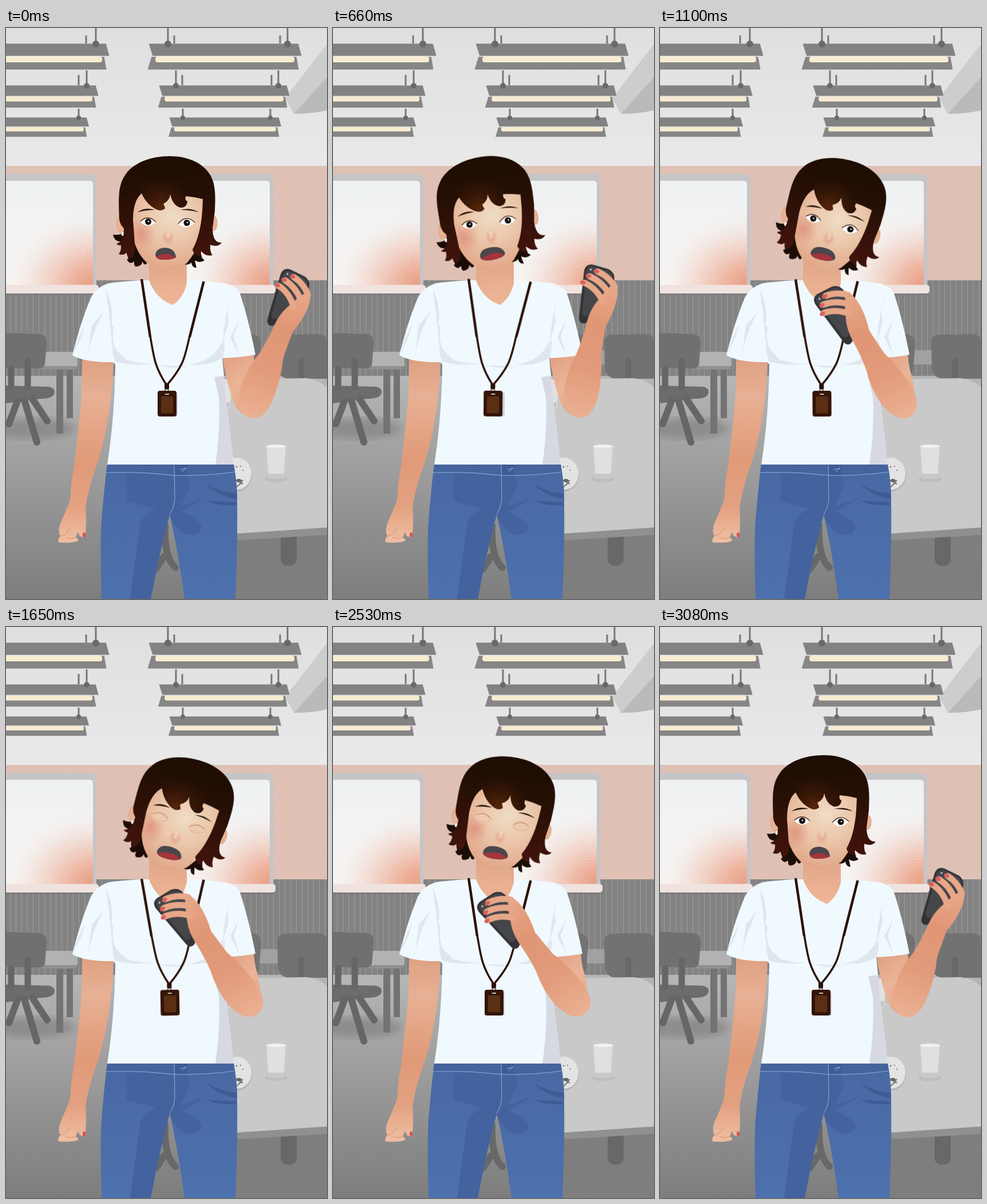
An HTML page that plays this animation: 561x998 px, repeating every 3.3 s.

```html
<!DOCTYPE html>
<html lang="en">
<head>
<meta charset="utf-8">
<title>Phone call in the canteen</title>
<style>
html, body { margin: 0; width: 100%; height: 100%; overflow: hidden; background: #e4e4e4; }
svg { position: absolute; left: 0; top: 0; width: 561px; height: 998px; will-change: transform; }

#head, #arm, #lanyard, #lids, .mouth { animation: 3300ms infinite; }

#head { transform-origin: 280px 412px; animation-name: tilt; }
@keyframes tilt {
  0% { transform: rotate(0deg); animation-timing-function: steps(4); }
  13.333% { transform: rotate(-4.2deg); animation-timing-function: steps(2); }
  20% { transform: rotate(-8deg); animation-timing-function: steps(2); }
  26.666% { transform: rotate(3.6deg); animation-timing-function: steps(2); }
  33.333% { transform: rotate(14.5deg); animation-timing-function: steps(5); }
  50% { transform: rotate(16deg); animation-timing-function: steps(3); }
  60% { transform: rotate(16deg); animation-timing-function: steps(5); }
  76.666% { transform: rotate(11deg); animation-timing-function: steps(5); }
  93.333%, 100% { transform: rotate(0deg); }
}

#arm { transform-origin: 425px 638px; animation-name: swing; }
@keyframes swing {
  0% { transform: translate(8px, 2px) rotate(22deg); animation-timing-function: steps(4); }
  13.333% { transform: translate(7px, 2px) rotate(20deg); animation-timing-function: steps(1); }
  16.666% { transform: translate(6px, 2px) rotate(18deg); animation-timing-function: steps(3); }
  26.666% { transform: translate(0, 0) rotate(0deg); animation-timing-function: steps(2); }
  33.333% { transform: translate(-14px, 9px) rotate(-31deg); animation-timing-function: steps(5); }
  50% { transform: translate(-14px, 9px) rotate(-34.5deg); animation-timing-function: steps(2); }
  56.666% { transform: translate(-14px, 9px) rotate(-35.2deg); animation-timing-function: steps(1); }
  60% { transform: translate(-14px, 9px) rotate(-35.2deg); animation-timing-function: steps(5); }
  76.666% { transform: translate(-14px, 9px) rotate(-37deg); animation-timing-function: steps(5); }
  93.333%, 100% { transform: translate(8px, 2px) rotate(22deg); }
}

#lanyard { transform-origin: 290px 440px; animation-name: sway; }
@keyframes sway {
  0% { transform: rotate(0deg); animation-timing-function: steps(4); }
  13.333% { transform: rotate(0deg); animation-timing-function: steps(4); }
  26.666% { transform: rotate(.95deg); animation-timing-function: steps(2); }
  33.333% { transform: rotate(-.4deg); animation-timing-function: steps(5); }
  50% { transform: rotate(-1.35deg); animation-timing-function: steps(2); }
  56.666% { transform: rotate(-.8deg); animation-timing-function: steps(1); }
  60% { transform: rotate(-.8deg); animation-timing-function: steps(5); }
  76.666%, 100% { transform: rotate(0deg); }
}

#lids { animation-name: blink; animation-timing-function: step-end; }
@keyframes blink {
  0%, 56.666%, 83.333%, 100% { opacity: 0; }
  50%, 76.666% { opacity: 1; }
}

.mouth { animation-timing-function: step-end; }
#round { animation-name: round; }
#shut { animation-name: shut; }
#wide { animation-name: wide; }
@keyframes round { 0%, 83.333%, 100% { opacity: 1; } 10% { opacity: 0; } }
@keyframes shut { 0%, 20%, 100% { opacity: 0; } 10% { opacity: 1; } }
@keyframes wide { 0%, 83.333%, 100% { opacity: 0; } 20% { opacity: 1; } }
</style>
</head>
<body>
<svg id="room" viewBox="0 0 561 998">
  <defs>
    <linearGradient id="ceiling" x2="0" y2="1"><stop stop-color="#dfdfdf"/><stop offset="1" stop-color="#e9e9e9"/></linearGradient>
    <linearGradient id="floor" x2="0" y2="1"><stop stop-color="#b6b6b6"/><stop offset=".3" stop-color="#a4a4a4"/><stop offset="1" stop-color="#7d7d7d"/></linearGradient>
    <linearGradient id="pane" x2="0" y2="1"><stop stop-color="#eef1f2"/><stop offset="1" stop-color="#f7f4f2"/></linearGradient>
    <radialGradient id="sunset"><stop stop-color="#e8977a"/><stop offset=".3" stop-color="#ecaa92" stop-opacity=".85"/><stop offset=".65" stop-color="#f1cdbf" stop-opacity=".6"/><stop offset="1" stop-color="#f5e6df" stop-opacity="0"/></radialGradient>
    <pattern id="slats" width="10" height="10" patternUnits="userSpaceOnUse"><path fill="#838383" d="M0 0H10V10H0Z"/><path fill="#9c9c9c" d="M7 0h1v10h-1z"/></pattern>
    <filter id="speckle"><feTurbulence type="fractalNoise" baseFrequency=".8" numOctaves="2"/><feDisplacementMap in="SourceGraphic" scale="70" xChannelSelector="R" yChannelSelector="G"/></filter>
    <filter id="grain" x="0" y="0" width="1" height="1"><feTurbulence type="fractalNoise" baseFrequency=".7"/><feColorMatrix values="0 0 0 0 .6  0 0 0 0 .42  0 0 0 0 .36  .5 0 0 0 -.14"/></filter>
    <filter id="soft"><feGaussianBlur stdDeviation="7"/></filter>
    <clipPath id="leftPane"><path d="M0 267H146Q152 267 152 273V449H0Z"/></clipPath>
    <clipPath id="rightPane"><path d="M300 267H455Q461 267 461 273V449H300Z"/></clipPath>
  </defs>
  <path fill="url(#ceiling)" d="M0 0H561V242H0Z"/>
  <path fill="#cdcdcd" d="M561 28L488 122L503 150L561 90Z"/>
  <path fill="#bababa" d="M561 86L503 150Q535 150 561 144Z"/>
  <g id="lamps"/>
  <path fill="#e0c2b6" d="M0 241H561V442H0Z"/>
  <path filter="url(#grain)" opacity=".55" d="M0 241H561V442H0Z"/>
  <path fill="url(#slats)" d="M0 441H561V609H0Z"/>
  <path fill="url(#floor)" d="M0 608H561V998H0Z"/>

  <g fill="#c5c5c8"><path d="M0 255H146Q158 255 158 268V450H0Z"/><path d="M296 255H455Q467 255 467 268V450H296Z"/></g>
  <g clip-path="url(#leftPane)"><path fill="url(#pane)" d="M0 260H160V450H0Z"/><ellipse cx="156" cy="452" rx="150" ry="125" fill="url(#sunset)" filter="url(#speckle)"/></g>
  <g clip-path="url(#rightPane)"><path fill="url(#pane)" d="M290 260H470V450H290Z"/><ellipse cx="465" cy="452" rx="140" ry="125" fill="url(#sunset)" filter="url(#speckle)"/></g>
  <path stroke="#6f6f6f" stroke-width="3" opacity=".5" d="M0 465H158M300 465H468"/>
  <g fill="#f0e3df"><rect x="-10" y="449" width="172" height="15" rx="5"/><rect x="290" y="449" width="181" height="15" rx="5"/></g>

  <!-- left table and chair -->
  <ellipse cx="45" cy="700" rx="75" ry="18" fill="#7c7c7c" opacity=".6" filter="url(#soft)"/>
  <path fill="#737373" d="M88 590h12v119h-12zM106 590h11v92h-11z"/>
  <path fill="#b2b2b2" d="M60 566H125V591H60Z"/><path fill="#8f8f8f" d="M60 591H123V597H60Z"/>
  <path fill="#707070" d="M0 533L60 535Q72 538 71 552L68 588Q66 596 55 595L0 594Z"/>
  <path fill="#6c6c6c" d="M0 625L75 627Q88 630 84 640Q80 648 60 648L0 656Z"/>
  <g fill="none" stroke="#666" stroke-width="11" stroke-linecap="round"><path d="M38 582V628M9 596V628"/><path stroke-width="12" d="M20 652L5 692M32 650L54 724M46 648L72 687"/></g>

  <!-- right side furniture -->
  <path fill="#a1a1a1" d="M440 563H475V588H440Z"/>
  <g fill="#727272"><path d="M400 535H430Q445 537 446 552L443 590Q442 609 430 612H400Z"/><path d="M486 536L548 535Q561 537 561 548V613H492Q476 610 475 592L474 550Q474 538 486 536Z"/></g>
  <path stroke="#686868" stroke-width="11" stroke-linecap="round" d="M516 582V612M426 585V606"/>
  <path fill="#7d7d7d" d="M395 890L561 884V998H395Z"/>
  <path filter="url(#grain)" opacity=".25" d="M395 890L561 884V998H395Z"/>
  <path fill="#686868" d="M480 885H508V930Q506 940 494 940Q482 940 480 930Z"/>
  <path fill="#c9c9c9" d="M350 615L525 612Q546 614 561 628V874L412 884L350 880Z"/>
  <path fill="#909090" d="M561 873L412 883Q400 885 380 883V894L412 895L561 886Z"/>
  <path fill="#e1e1e1" d="M366 614H395L391 665H370Z"/><path fill="#c4c4c4" d="M372 654H391L390 664H373Z"/>
  <ellipse cx="472" cy="788" rx="20" ry="6" fill="#bebebe"/>
  <path fill="#e0e0e0" stroke="#d6d6d6" d="M455 731L489 730L485 787H459Z"/><ellipse cx="472" cy="731" rx="17" ry="3" fill="#f1f1f1"/><path fill="#c8c8c8" d="M458 779H486L485 787H459Z"/>
  <ellipse cx="404" cy="781" rx="26" ry="29" fill="#b5b5b5"/><ellipse cx="404" cy="779" rx="25" ry="28" fill="#e3e3e3"/>
  <g fill="#666"><circle cx="403" cy="767" r="1.300"/><circle cx="410" cy="766" r="1"/><circle cx="414" cy="773" r="1"/><ellipse cx="407" cy="791" rx="5" ry="3"/></g>
  <path stroke="#777" stroke-width="2" d="M402 803L409 797L414 790M408 794L414 797"/>
  <path fill="none" stroke="#686868" stroke-width="12" stroke-linecap="round" d="M278 870Q276 925 296 943M276 924L262 946"/>
</svg>

<svg id="person" viewBox="0 0 561 998">
  <defs>
    <linearGradient id="hangArm" gradientUnits="userSpaceOnUse" x1="0" y1="580" x2="0" y2="900"><stop stop-color="#dfa183"/><stop offset=".2" stop-color="#e7b094"/><stop offset=".55" stop-color="#e09a78"/><stop offset=".8" stop-color="#e3a181"/><stop offset="1" stop-color="#efbfa3"/></linearGradient>
    <linearGradient id="upper" gradientUnits="userSpaceOnUse" x1="380" y1="580" x2="440" y2="660"><stop stop-color="#e1a183"/><stop offset=".5" stop-color="#ebb598"/><stop offset="1" stop-color="#e5a485"/></linearGradient>
    <linearGradient id="fore" gradientUnits="userSpaceOnUse" x1="0" y1="420" x2="0" y2="680"><stop stop-color="#eaad8f"/><stop offset=".35" stop-color="#e09675"/><stop offset=".65" stop-color="#e19a7a"/><stop offset="1" stop-color="#ebb193"/></linearGradient>
    <linearGradient id="neck" gradientUnits="userSpaceOnUse" x1="0" y1="400" x2="0" y2="484"><stop stop-color="#e0a587"/><stop offset="1" stop-color="#eeb697"/></linearGradient>
    <linearGradient id="hair" gradientUnits="userSpaceOnUse" x1="0" y1="224" x2="0" y2="400"><stop stop-color="#1d0d02"/><stop offset=".35" stop-color="#240f04"/><stop offset="1" stop-color="#42140d"/></linearGradient>
    <radialGradient id="fringe" gradientUnits="userSpaceOnUse" cx="270" cy="314" r="62"><stop stop-color="#572609"/><stop offset="1" stop-color="#2a1104" stop-opacity="0"/></radialGradient>
    <radialGradient id="face" gradientUnits="userSpaceOnUse" cx="291" cy="328" r="98"><stop stop-color="#efdcc5"/><stop offset=".45" stop-color="#ebc7ab"/><stop offset="1" stop-color="#e0a587"/></radialGradient>
    <radialGradient id="blush"><stop stop-color="#dd8a76" stop-opacity=".7"/><stop offset="1" stop-color="#dd8a76" stop-opacity="0"/></radialGradient>
    <linearGradient id="jeans" x2="0" y2="1"><stop stop-color="#4868a3"/><stop offset="1" stop-color="#4d71ae"/></linearGradient>
  </defs>

  <!-- hanging arm -->
  <path fill="url(#hangArm)" d="M133 578H188Q186 640 178 685Q170 735 153 780Q142 815 139 838Q141 860 139 884L137 891L129 888L126 881L122 890L127 895Q122 901 92 899Q90 893 95 888Q90 880 95 866Q104 846 112 825Q114 790 119 765Q128 690 132 640Z"/>
  <path fill="none" stroke="#d98c6c" d="M95 888Q105 887 112 874M122 890Q112 895 104 890"/>
  <ellipse cx="136.500" cy="886" rx="2.500" ry="4.500" fill="#d4545a"/>

  <!-- jeans -->
  <path fill="url(#jeans)" d="M177 762H398Q405 800 404 830Q405 900 401 998H312Q300 910 286 850Q270 910 253 998H167Q164 900 167 860Q172 800 177 762Z"/>
  <path fill="#45639d" d="M177 763H398L399 777Q340 785 294 781L175 777Z"/>
  <path fill="#44629d" d="M211 779L211 827L262 840Q238 850 234 870L217 998H253Q268 915 286 851Q300 886 325 886Q346 882 340 866Q322 850 306 846L350 820L305 836L322 800L318 782Z"/>
  <path fill="#3f5b94" d="M294 764H317L316 782H294ZM403 823Q375 820 348 796Q375 812 403 814ZM402 834Q370 836 350 826Q375 828 402 829Z"/>
  <path fill="none" stroke="#8fb0dc" d="M175 777Q235 776 262 779L294 782Q350 783 399 776M294 764L295 822Q294 838 286 850M304 772L315 769L307 776"/>

  <!-- neck, raised upper arm, shirt -->
  <path fill="url(#neck)" d="M250 395V436Q245 450 262 475L292 488L316 470V395Z"/>
  <path fill="url(#upper)" d="M378 574L433 569Q434 590 440 608Q447 640 443 655Q436 680 420 678Q404 670 398 655Q384 615 378 574Z"/>
  <path fill="#f0f9fe" d="M236 441Q200 443 180 446Q157 453 148 472Q130 515 116 572Q138 585 187 584L191 588Q190 680 177 763H398L387 670L378 577Q410 576 436 571Q424 510 409 464Q404 452 383 446Q350 442 317 441Q312 470 292 484Q262 474 250 441Z"/>
  <path fill="#d7d9e2" d="M364 610L381 608L387 670L398 763H366Q375 700 372 645Z"/>
  <g fill="#e0e6ed">
    <path d="M174 456Q190 490 184 518L188 524Q184 545 192 562L215 585Q192 583 187 572Q180 490 174 456Z"/>
    <path d="M170 496L150 520L143 574Q148 540 170 496ZM138 518L132 540L118 569Q124 545 138 518Z"/>
    <path d="M190 583Q222 592 262 586Q225 589 188 572ZM262 589L322 592L290 594Z"/>
    <path d="M318 588Q360 585 378 548L379 576Q356 592 318 588ZM397 458Q384 490 389 515L380 545Q385 550 379 575Q376 520 397 458Z"/>
    <path d="M407 511L392 540L409 575L398 540Z"/>
  </g>
  <rect x="270" y="637" width="30" height="42" rx="3" fill="#cfd0d6"/>

  <g id="lanyard">
    <g fill="none" stroke="#2d1006" stroke-linejoin="round"><path stroke-width="4.500" d="M237 439L252 540M345.500 443L321 540"/><path stroke-width="3.500" d="M252 538Q258 575 262 587Q268 605 280 623M321 538Q313 575 307 587Q298 605 282 623"/></g>
    <rect x="277" y="622" width="8" height="9" rx="1" fill="#2d1006"/><circle cx="281" cy="634" r="3" fill="none" stroke="#444" stroke-width="1.500"/>
    <rect x="265" y="634" width="33" height="45" rx="4" fill="#351507"/><rect x="270" y="643" width="23" height="31" rx="3" fill="#5a2f14" stroke="#210b02"/>
    <path stroke="#c9c2bd" stroke-width="2" d="M278 640H285"/>
  </g>

  <g id="head">
    <path fill="#1b0d05" d="M222 345L207 350Q206 364 187 361Q190 376 206 373L212 398Q216 405 211 404Q216 415 224 408Q223 417 228 417Q238 416 238 408Q242 416 246 412L244 380ZM325 380Q318 402 309 412Q318 416 324 410Q325 419 333 419Q331 412 330 406Q338 412 347 406Q338 400 338 385Z"/>
    <g fill="#e9b294" stroke="#dc9c7d"><ellipse cx="200" cy="343" rx="6.500" ry="14"/><ellipse cx="363" cy="341" rx="6" ry="13"/></g>
    <circle cx="205" cy="360" r="3.500" fill="#f5f5f5"/>
    <path fill="url(#face)" d="M215 275H350V350Q342 378 316 411Q295 425 276 425Q258 422 245 409Q228 393 222 365Z"/>
    <ellipse cx="237" cy="360" rx="24" ry="28" fill="url(#blush)"/>
    <ellipse cx="283" cy="366" rx="11" ry="14" fill="url(#blush)"/>
    <path fill="#f6dcc7" opacity=".6" d="M280 358Q283 350 287 359L286 368H280Z"/>
    <path fill="url(#hair)" d="M198 335C197 300 195 278 207 259C221 235 254 224 286 224C320 224 345 237 357 257C367 274 366 297 365 320L361 350Q361 376 377 375Q371 384 357 379Q356 392 361 397Q349 400 341 390Q340 396 343 400Q328 398 326 387Q340 362 343 320L344 299Q328 295 314 294Q312 301 317 303Q316 314 305 314Q291 310 287 290Q286 302 275 307L278 315Q272 321 263 317Q246 309 237 289Q222 302 222 335L225 377Q228 393 219 402Q211 400 212 391Q206 399 197 395Q202 389 201 380Q195 380 193 377Q207 373 206 350Q200 345 198 335Z"/>
    <path fill="url(#fringe)" d="M215 265H340V298L314 294Q312 301 317 303Q316 314 305 314Q291 310 287 290Q286 302 275 307L278 315Q272 321 263 317Q246 309 237 289Z"/>
    <path fill="#2b1a12" d="M230 322Q243 312 260 318Q245 318 230 322ZM305 318Q322 313 337 322Q321 318 305 318Z"/>
    <g fill="#fff"><path d="M235 339Q248 325 262 339Q249 352 235 339Z"/><path d="M301 342Q315 325 330 340Q316 355 301 342Z"/></g>
    <path fill="none" stroke="#49291b" stroke-width="1.300" d="M235 338Q248 325 262 339M301 342Q315 325 330 340"/>
    <circle cx="248.500" cy="338.500" r="5.500" fill="#14100e"/><circle cx="316" cy="340.500" r="5.500" fill="#14100e"/>
    <circle cx="249" cy="338" r="1.300" fill="#fff"/><circle cx="317" cy="340" r="1.300" fill="#fff"/>
    <g id="lids" fill="#edc9ae">
      <ellipse cx="248.500" cy="338.500" rx="14.500" ry="9.500"/><ellipse cx="315.500" cy="340.500" rx="15.500" ry="10"/>
      <path fill="none" stroke="#c99270" stroke-width="1.300" d="M235 336Q248 326 261 337M302 340Q315 328 329 338"/>
      <path fill="none" stroke="#dba98a" d="M236 341Q249 351 261 340M302 344Q316 353 329 342"/>
    </g>
    <g id="round" class="mouth"><path fill="#48474b" d="M261 396Q263 384 279 384Q296 386 297 401Q289 405 278 405Q262 406 261 396Z"/><path fill="#a5343c" d="M262 400Q270 395 281 395Q292 396 296 402Q288 405 278 405Q265 406 262 400Z"/></g>
    <path id="shut" class="mouth" fill="none" stroke="#c4705c" stroke-width="1.500" stroke-linecap="round" d="M265 391Q279 386 295 391"/>
    <g id="wide" class="mouth"><path fill="#48474b" d="M259 398Q259 384 279 383Q300 383 303 396Q303 403 284 405Q262 407 259 398Z"/><path fill="#a5343c" d="M260 401Q268 395 281 394Q294 393 301 399Q296 404 284 405Q266 406 260 401Z"/></g>
  </g>

  <g id="arm">
    <path fill="#323335" d="M390 426Q390 413 402 412L431 414Q443 417 445 430L438 480L416 508Q413 517 405 516Q399 515 398 506Z"/>
    <path fill="#45464a" d="M394 427Q394 416 404 415L430 417Q440 419 442 431L434 476L414 500Q406 506 402 499Z"/>
    <path fill="url(#fore)" d="M447 432Q456 444 456 464Q456 486 447 513L449 560Q461 600 459 643Q456 679 428 679Q405 675 399 635Q397 600 407 570Q412 545 413 515Q414 492 422 476L432 456Z"/>
    <g fill="none" stroke="#e7a788" stroke-width="10.500" stroke-linecap="round"><path d="M413 422Q434 426 448 442"/><path d="M401 433Q423 437 440 455"/><path d="M394 446Q416 450 432 470"/></g>
    <g fill="#d95f5c"><ellipse cx="411" cy="422" rx="5" ry="3.500"/><ellipse cx="399" cy="433" rx="5" ry="3.500"/><ellipse cx="392" cy="446" rx="5" ry="3.500"/></g>
    <circle cx="401" cy="421" r="1.500" fill="#e8e8e8"/>
  </g>
</svg>

<script>
// One hanging lamp; s is the size relative to the nearest row.
function lamp(x1, x2, y, s) {
  const poly = (fill, ...pts) =>
    `<polygon fill="${fill}" stroke="#f0f0f0" stroke-width=".6" points="${pts.map(([x, dx, dy]) => `${x + dx * s},${y + dy * s}`).join(' ')}"/>`;
  return poly('#828282', [x1, 0, 0], [x2, 0, 0], [x2, 6, 22], [x1, 7, 22]) +
    poly('#868686', [x1, 5, 23], [x2, -3, 23], [x2, 1, 46], [x1, -2, 46]) +
    `<rect x="${x1 + 12 * s}" y="${y + 23 * s}" width="${x2 - x1 - 19 * s}" height="${10 * s}" rx="${4 * s}" fill="#f7ecd2"/>`;
}
function rod(x, top, bottom, knob) {
  return `<path stroke="#777" stroke-width="3" d="M${x} ${top}V${bottom}"/><circle cx="${x}" cy="${bottom}" r="${knob}" fill="#696969"/>`;
}
const lamps = [[-40, 175, 27, 1], [249, 511, 27, 1], [-40, 157, 100, .86], [267, 491, 100, .86], [-40, 141, 156, .75], [285, 477, 156, .75]];
const rods = [
  ...[157, 283, 492].map(x => [x, 0, 28, 6]), ...[140, 294, 479].map(x => [x, 13, 27, 0]),
  ...[141, 297, 476].map(x => [x, 74, 101, 5]), ...[127, 308, 464].map(x => [x, 82, 100, 0]),
  ...[127, 309, 462].map(x => [x, 141, 157, 4])
];
document.getElementById('lamps').innerHTML =
  lamps.map(l => lamp(...l)).join('') + rods.map(r => rod(...r)).join('');
</script>
</body>
</html>
```
